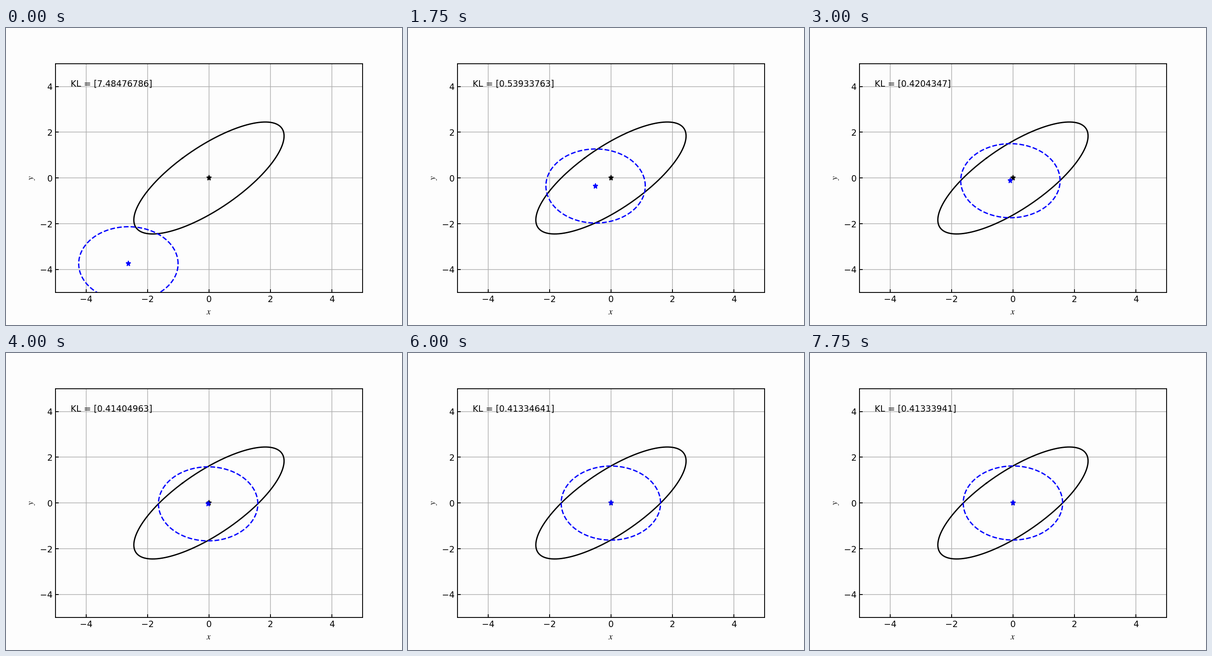
Recreate the animation shown at these times as a matplotlib script. Size 864 by 648 pixels, loop 8 s.

```python
import numpy as np
import matplotlib.pyplot as plt
from matplotlib.animation import FuncAnimation

plt.rcParams.update({
    "font.family": "DejaVu Sans",
    "font.size": 10,
    "mathtext.fontset": "stix",
    "xtick.direction": "in",
    "ytick.direction": "in",
    "xtick.major.width": 1.0,
    "ytick.major.width": 1.0,
    "axes.linewidth": 1.0,
})

FRAMES = 32
INTERVAL = 250
RHO = 0.75
COV = np.array([[1, RHO], [RHO, 1]])
PRECISION = np.linalg.inv(COV)
Q_VAR = 1 - RHO ** 2          # variance of the factorised approximation
CHI2_95 = 5.991               # 95 % level for two degrees of freedom
START = np.array([-2.625, -3.75])
BACKGROUND = "#fdfdfd"


def contour(cov):
    """Points on the 95 % ellipse of a zero-mean Gaussian."""
    t = np.linspace(0, 2 * np.pi, 400)
    vals, vecs = np.linalg.eigh(cov)
    axes = vecs * np.sqrt(CHI2_95 * vals)
    return axes @ np.array([np.cos(t), np.sin(t)])


def mean_at(step):
    """Each update swaps the coordinates and shrinks them by RHO."""
    mean = START if step % 2 == 0 else START[::-1]
    return mean * RHO ** step


def kl_divergence(mean):
    return 0.5 * mean @ PRECISION @ mean - 0.5 * np.log(Q_VAR)


fig, ax = plt.subplots(figsize=(6.4, 4.8), dpi=135, facecolor=BACKGROUND)
fig.subplots_adjust(left=0.125, right=0.9, bottom=0.11, top=0.88)
ax.set_facecolor(BACKGROUND)
ax.set(xlim=(-5, 5), ylim=(-5, 5), xlabel="$x$", ylabel="$y$")
ax.set_xticks(range(-4, 5, 2))
ax.set_yticks(range(-4, 5, 2))
ax.grid(True, color="#b0b0b0", linewidth=0.8)

q_shape = contour(Q_VAR * np.eye(2))
ax.plot(*contour(COV), "k-", lw=1.5)
ax.plot(0, 0, "k*", ms=6)
q_line, = ax.plot([], [], "b--", lw=1.5)
q_star, = ax.plot([], [], "b*", ms=6)
label = ax.text(-4.5, 4, "")


def update(step):
    mean = mean_at(step)
    q_line.set_data(*(q_shape + mean[:, None]))
    q_star.set_data(mean[:1], mean[1:])
    label.set_text(f"KL = {np.array([kl_divergence(mean)])}")
    return q_line, q_star, label


anim = FuncAnimation(fig, update, frames=FRAMES, interval=INTERVAL,
                     repeat=True, repeat_delay=0)
plt.show()
```
